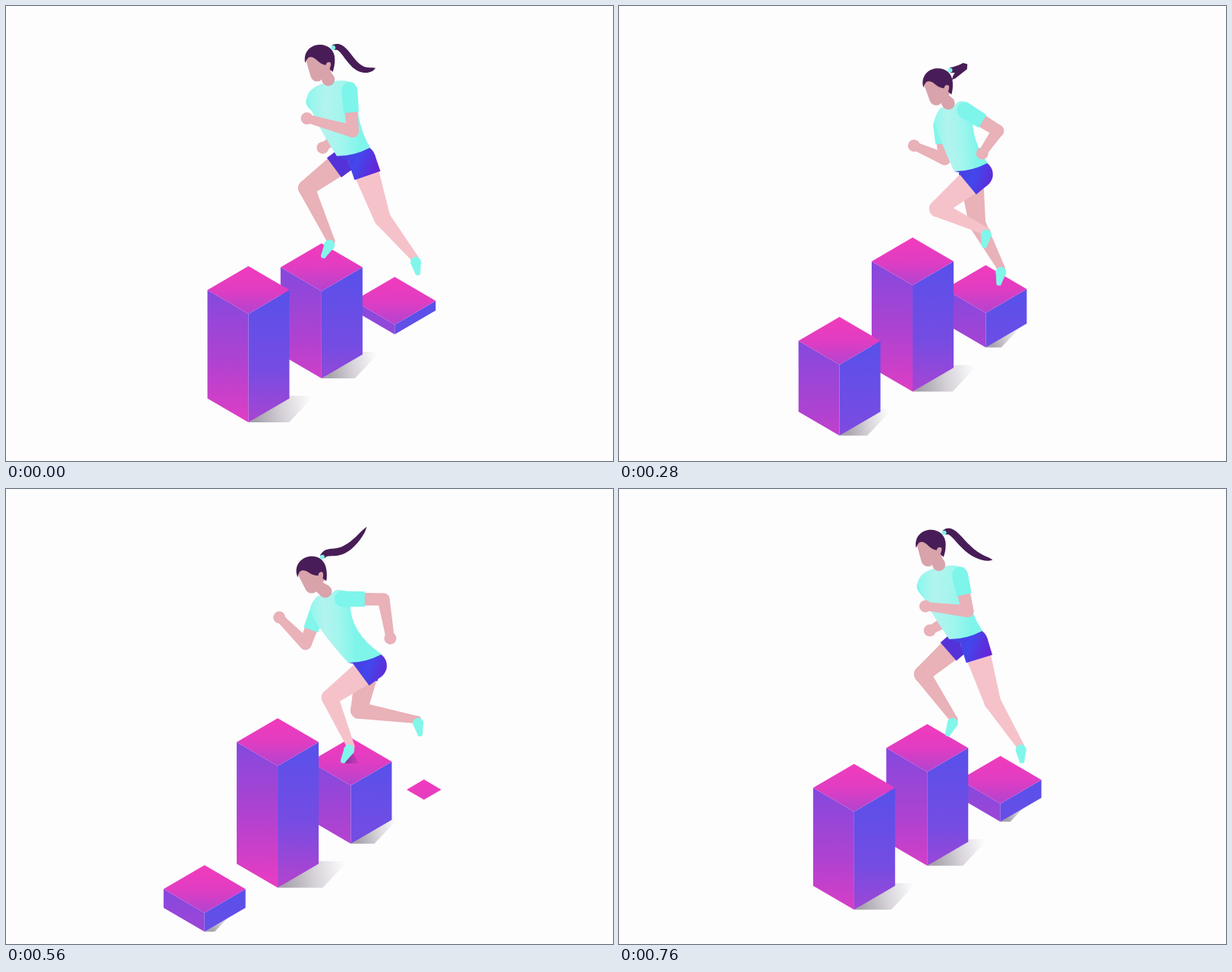
These frames come from a looping animation (800 px wide and 600 px high, 0.8 s). An HTML page with a canvas:

```html
<!DOCTYPE html>
<html lang="en">
<head>
<meta charset="utf-8">
<title>Runner on rising blocks</title>
<style>
html, body { margin: 0; width: 100%; height: 100%; overflow: hidden; background: #fdfdfe; }
canvas { display: block; }
</style>
</head>
<body>
<canvas id="stage" width="800" height="600"></canvas>
<script>
const ctx = document.getElementById('stage').getContext('2d');
const LOOP = 800, STEP = 40;
const PAPER = '#fdfdfe', SKIN = '#e9b1b8', LIT_SKIN = '#f5c2ca', FACE = '#d8a3aa';
const HAIR = '#481d57', MINT = '#82f6ea';

const mix = (a, b, f) => a + (b - a) * f;
const between = (p, q, f) => [mix(p[0], q[0], f), mix(p[1], q[1], f)];
const shift = (p, dx, dy) => [p[0] + dx, p[1] + dy];
const clamp01 = v => Math.max(0, Math.min(1, v));

// A swing once per loop plus one twice per loop; peaks are given in ms.
const swing = (t, amp, peak) => amp * Math.cos((t - peak) / LOOP * 2 * Math.PI);
const wave = (t, mean, amp, peak, amp2 = 0, peak2 = 0) =>
  mean + swing(t, amp, peak) + swing(2 * t, amp2, 2 * peak2);

function legAt(t, hip) {
  const knee = [wave(t, 446, -50, 10), wave(t, 273, -20, 15, -13, 0)];
  const ankle = [wave(t, 492, -62, 60, -8, 0), wave(t, 322, 25, 260)];
  const toe = shift(ankle, wave(t, -4, -10, 80), 22);
  return { hip, knee, ankle, toe };
}

function poseAt(t) {
  const hip = [wave(t, 476, 0, 0, 8, 170), wave(t, 219, -5, 0, 13, 180)];
  const neck = [wave(t, 427, 10, 180, 4, 180), wave(t, 126, -10, 10, 13, 195)];
  const head = shift(neck, wave(t, -15, 0, 0, -4, 170), -34);
  const tilt = wave(t, -.1, 0, 0, -.1, 170);
  const waistR = shift(hip, 11, -15);
  const cos = Math.cos(tilt), sin = Math.sin(tilt);
  const tie = shift(head, 18 * cos + 14 * sin, 18 * sin - 14 * cos);
  return {
    head, tilt, neck, tie, waistR,
    waistL: shift(waistR, -44, 11),
    front: shift(neck, wave(t, -22, -6, 0), 16),
    back: shift(neck, wave(t, 25, 4, 0), wave(t, -6, 3, 0)),
    bend1: shift(tie, wave(t, 18, 9, 200), wave(t, -9, 7, 200)),
    bend2: shift(tie, 24, wave(t, 15, -10, 200, 30, 30)),
    tip: shift(tie, wave(t, 38, -37, 200, 18, 0), wave(t, -2, 0, 0, 38, 355)),
    nearElbow: [wave(t, 485, -20, 0, -8, 0), wave(t, 158, 28, 90, -14, 0)],
    nearHand: [wave(t, 462, -62, 40, -8, 360), wave(t, 179, -10, 0, -21, 10)],
    farElbow: [wave(t, 423, 38, 95, -6, 0), wave(t, 190, -7, 0, -17, 10)],
    farHand: [wave(t, 389, 32, 83, 3, 0), wave(t, 179, 26, 67, -15, 15)],
    nearLeg: legAt(t + LOOP / 2, hip),
    farLeg: legAt(t, shift(hip, wave(t, -13, -10, 50), 1))
  };
}

function gradient(from, to, ...colors) {
  const g = ctx.createLinearGradient(...from, ...to);
  colors.forEach((c, i) => g.addColorStop(i / (colors.length - 1), c));
  return g;
}

function polygon(fill, ...points) {
  ctx.fillStyle = fill;
  ctx.beginPath();
  points.forEach(p => ctx.lineTo(...p));
  ctx.fill();
}

function disc(fill, p, r) {
  ctx.fillStyle = fill;
  ctx.beginPath();
  ctx.arc(...p, r, 0, 7);
  ctx.fill();
}

// Tapered bar with a round start; the end is round unless flat.
function taper(fill, a, ra, b, rb, flat) {
  const angle = Math.atan2(b[1] - a[1], b[0] - a[0]) + Math.PI / 2;
  const nx = Math.cos(angle), ny = Math.sin(angle);
  polygon(fill, shift(a, nx * ra, ny * ra), shift(b, nx * rb, ny * rb),
    shift(b, -nx * rb, -ny * rb), shift(a, -nx * ra, -ny * ra));
  disc(fill, a, ra);
  if (!flat) disc(fill, b, rb);
}

function blockHeight(x) {
  if (x < 252 || x > 520) return 0;
  return x < 350 ? 164 * Math.sin((x - 252) / 100 * Math.PI / 2)
    : 164 * (1 - ((x - 350) / 173) ** 1.25);
}

function drawBlock(x) {
  const size = Math.min(clamp01((x - 226) / 26), clamp01((572 - x) / 50));
  if (size < .06) return;
  const base = 549 - .602 * (x - 319.5), h = blockHeight(x);
  const w = 54 * size, d = 31.5 * size, y = base - h - d;
  if (h > 15) {
    const reach = x + 38 + .34 * h;
    polygon(gradient([x + 10, base], [reach, base - 14], '#a7a2ab', '#d8d4da', PAPER),
      [x, base], [reach - 33, base], [reach, base - 35], [x + w, base - 35]);
  }
  polygon(gradient([0, y], [0, y + 195], '#8449de', '#b142d0', '#ec3cc0'),
    [x - w, y], [x, y + d], [x, base], [x - w, base - d]);
  polygon(gradient([0, y + 10], [0, y + 200], '#5a50ea', '#764ce2', '#bb42cc'),
    [x + w, y], [x, y + d], [x, base], [x + w, base - d]);
  polygon(gradient([0, y - d], [0, y - d + 64], '#f23bbc', '#e03dc2', '#b044d0'),
    [x, y - d], [x + w, y], [x, y + d], [x - w, y]);
}

function drawLeg(skin, shorts, { hip, knee, ankle, toe }, r) {
  taper(skin, hip, r, knee, 11);
  taper(skin, knee, 11, ankle, 5);
  taper(MINT, between(ankle, toe, .2), 7, between(ankle, toe, .84), 3.5);
  taper(shorts, hip, r, between(hip, knee, .28), r, true);
}

function drawArm(shoulder, elbow, hand, sleeve) {
  taper(SKIN, shoulder, 9, elbow, 8);
  taper(SKIN, elbow, 8, hand, 5.5);
  disc(SKIN, hand, 8);
  taper(sleeve, shoulder, 10.5, between(shoulder, elbow, .54), 10, true);
}

function drawShirt({ neck, front, back, waistL, waistR }) {
  const side = shift(back, 9, 16);
  ctx.fillStyle = gradient([front[0], front[1] + 20], [back[0] + 14, back[1] + 40],
    '#8ff8ee', '#b3f3ee', '#a0f6ee', '#7ff5ea');
  ctx.beginPath();
  ctx.moveTo(neck[0] - 10, neck[1]);
  ctx.quadraticCurveTo(front[0] + 3, front[1] - 10, ...front);
  ctx.quadraticCurveTo(front[0] + 4, mix(front[1], waistL[1], .3), ...waistL);
  const hem = between(waistL, waistR, .5);
  ctx.quadraticCurveTo(hem[0], hem[1] + 6, ...waistR);
  ctx.quadraticCurveTo(back[0] + 8, mix(back[1], waistR[1], .65), ...side);
  ctx.quadraticCurveTo(back[0] + 8, back[1], ...back);
  ctx.quadraticCurveTo(back[0] - 10, back[1] - 3, neck[0] + 9, neck[1] - 4);
  ctx.fill();
}

function drawPonytail({ tie, bend1, bend2, tip }) {
  const left = [], right = [];
  for (let i = 0; i <= 24; i++) {
    const u = i / 24;
    const a = between(tie, bend1, u), b = between(bend1, bend2, u), c = between(bend2, tip, u);
    const p = between(a, b, u), q = between(b, c, u), mid = between(p, q, u);
    const r = (3.5 + 7 * u) * Math.sqrt(1 - u) / (Math.hypot(q[0] - p[0], q[1] - p[1]) || 1);
    const nx = (p[1] - q[1]) * r, ny = (q[0] - p[0]) * r;
    left.push(shift(mid, nx, ny));
    right.unshift(shift(mid, -nx, -ny));
  }
  polygon(HAIR, ...left, ...right);
  disc(MINT, tie, 3);
}

const facePath = new Path2D('M-18 2L-12 24Q-9 32 0 30L6 24L18 14L14-6L-10-8Z');
const hairPath = new Path2D('M-19 6C-22-9-11-18 0-18C12-18 20-10 20 1C20 8 19 13 17 18' +
  'L13 14C15 9 16 5 12 5Q9 5 8 9Q2 8-3 3Q-10-4-15-1Q-18 2-19 6Z');

function drawHead({ head, tilt, neck }) {
  taper(FACE, shift(head, 8, 20), 7, shift(neck, 0, -6), 8.5);
  ctx.save();
  ctx.translate(...head);
  ctx.rotate(tilt);
  ctx.fillStyle = FACE;
  ctx.fill(facePath);
  ctx.fillStyle = HAIR;
  ctx.fill(hairPath);
  ctx.restore();
}

// Cast while the foot rides on a block.
function drawFootShadow(t, { toe }) {
  const phase = t % LOOP;
  if (phase < 80 || phase > 250) return;
  polygon(gradient(toe, shift(toe, 24, 0), '#4d1f88cc', '#b03cb055'),
    toe, shift(toe, 23, 0), shift(toe, 13, -16));
}

function drawRunner(t) {
  const p = poseAt(t), { nearLeg, farLeg } = p;
  drawFootShadow(t, farLeg);
  drawFootShadow(t + LOOP / 2, nearLeg);

  const shorts = gradient(p.waistL, shift(nearLeg.hip, 18, 16), '#4a3ade', '#4347ec', '#6426d6');
  drawArm(shift(p.front, 9, 7), p.farElbow, p.farHand, MINT);
  drawLeg(SKIN, '#5432d8', farLeg, 16);
  drawLeg(LIT_SKIN, shorts, nearLeg, 18);
  polygon(shorts, p.waistL, p.waistR, nearLeg.hip, farLeg.hip);

  drawPonytail(p);
  drawShirt(p);
  drawHead(p);
  drawArm(shift(p.back, -1, 11), p.nearElbow, p.nearHand, '#7df5ea');
}

function render(now) {
  const t = Math.floor(now % LOOP / STEP) * STEP;
  ctx.fillStyle = PAPER;
  ctx.fillRect(0, 0, 800, 600);
  const travel = t % 400 / 400;
  for (let n = 2; n >= -1; n--) drawBlock(319.5 + 96.4 * (n + travel));
  drawRunner(t);
}

const start = performance.now();
function loop() {
  render(performance.now() - start);
  requestAnimationFrame(loop);
}
loop();
</script>
</body>
</html>
```
